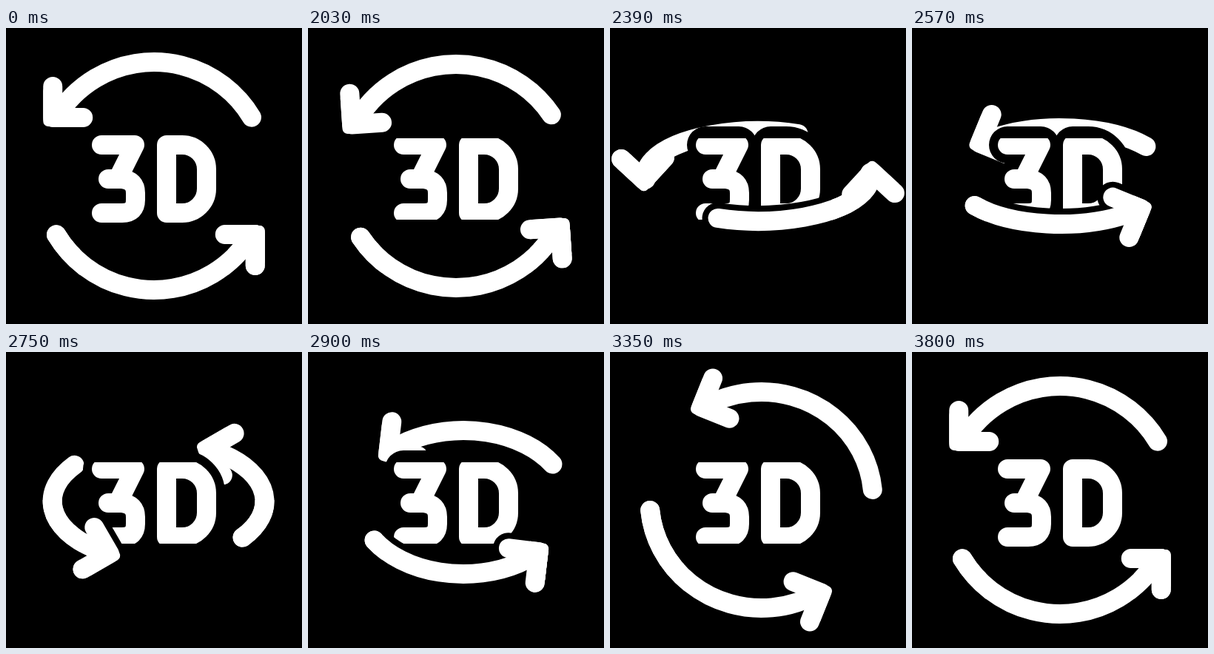
Write an HTML page with a canvas that moves like this. It is 400 px wide and 400 px high and loops after 3.83 s.

```html
<!DOCTYPE html>
<html lang="en">
<head>
<meta charset="utf-8">
<title>3D rotation</title>
<style>
html, body { margin: 0; height: 100%; overflow: hidden; background: #000; }
canvas { display: block; }
</style>
</head>
<body>
<canvas id="stage" width="400" height="400"></canvas>
<script>
const ctx = document.getElementById('stage').getContext('2d');
const LOOP = 3830, HOLD = 2000, STEP = 30, LAST = 60;
const WIDTH = 26, LABEL_HALO = 50, ARROW_HALO = 42, RAD = Math.PI / 180;

const label = new Path2D(
  'M129 158H174L152 202M138 204H157Q175 206 175 223V232Q175 250 157 250H129' +
  'M217 158H238A33 33 0 0 1 271 191V217A33 33 0 0 1 238 250H217Z');
const head = new Path2D('M0 -42V0H41');
const corner = new Path2D('M-6 -36V5H36');

// step, radius x, shift x, radius y, shift y, tip turn, tail turn, head lean (degrees)
const keys = [
  [0, 154, 0, 154, 0, 0, 0, -15],
  [1, 154, 0, 151, 0, 3.3, 2.2, -14],
  [7, 154, 0, 75, 0, 84, 74, -17],
  [13, 152, 0, 61, 0, 215, 218, -10],
  [19, 147, 0.5, 65, 0, 347.4, 367, -3],
  [30, 142, 10, 97, 3, 526, 541, 3],
  [45, 151, 4.5, 146, 0, 692, 694.5, -8],
  [60, 154, 0, 154, 0, 720, 720, -15]
];

const slope = (i, c) => (keys[i + 1][c] - keys[i][c]) / (keys[i + 1][0] - keys[i][0]);

// Harmonic mean of the neighbouring slopes keeps the curve free of overshoot.
function tangent(i, c) {
  if (i === 0 || i === keys.length - 1) return 0;
  const p = slope(i - 1, c), q = slope(i, c);
  return p * q > 0 ? 2 * p * q / (p + q) : 0;
}

function sample(n, c) {
  let i = 0;
  while (i < keys.length - 2 && n >= keys[i + 1][0]) i++;
  const span = keys[i + 1][0] - keys[i][0];
  const u = (n - keys[i][0]) / span, v = 1 - u;
  return keys[i][c] * v * v * (1 + 2 * u) + keys[i + 1][c] * u * u * (3 - 2 * u) +
    span * u * v * (tangent(i, c) * v - tangent(i + 1, c) * u);
}

function stroke(path, width, color) {
  ctx.lineWidth = width;
  ctx.strokeStyle = color;
  ctx.stroke(path);
}

function clipped(x, y, w, h, draw) {
  ctx.save();
  ctx.beginPath();
  ctx.rect(x, y, w, h);
  ctx.clip();
  draw();
  ctx.restore();
}

function makeArrow(n, half) {
  const [a, dx, b, dy, tipTurn, tailTurn, lean] =
    [1, 2, 3, 4, 5, 6, 7].map(c => sample(n, c));
  const tip = (150 + half + tipTurn) * RAD;
  const tail = (31 + half + tailTurn) * RAD;
  const x = 200 + dx, y = 200 + dy;
  const reach = 1 - 0.0017 * lean; // an outward lean carries the head off the arc
  const arc = new Path2D();
  arc.ellipse(x, y, a, b, 0, -tail, -tip + RAD, true);
  return {
    arc,
    front: Math.sin(tip) < 0,
    x: x + a * reach * Math.cos(tip),
    y: y - b * reach * Math.sin(tip),
    turn: 225 * RAD - Math.atan2(b * Math.cos(tip), -a * Math.sin(tip)) - lean * RAD
  };
}

function drawHead(arrow, width, color) {
  ctx.save();
  ctx.translate(arrow.x, arrow.y);
  ctx.rotate(arrow.turn);
  stroke(head, width, color);
  stroke(corner, width - 12, color);
  ctx.restore();
}

function render(n) {
  const arrows = [makeArrow(n, 0), makeArrow(n, 180)];
  const resting = n === 0 || n === LAST;
  ctx.fillStyle = '#000';
  ctx.fillRect(0, 0, 400, 400);
  ctx.lineCap = ctx.lineJoin = 'round';

  for (const arrow of arrows) {
    stroke(arrow.arc, WIDTH, '#fff');
    drawHead(arrow, WIDTH, '#fff');
  }

  // While turning, the lettering is trimmed flat at top and bottom.
  stroke(label, LABEL_HALO, '#000');
  const [top, bottom] = resting ? [0, 400] : [149, 259];
  clipped(0, top, 400, bottom - top, () => stroke(label, WIDTH, '#fff'));

  // The near half passes over the lettering with a black gap.
  const near = arrows.filter(arrow => arrow.front);
  clipped(100, 200, 200, 200, () => arrows.forEach(arrow => stroke(arrow.arc, ARROW_HALO, '#000')));
  clipped(100, 0, 200, 400, () => near.forEach(arrow => drawHead(arrow, ARROW_HALO, '#000')));
  clipped(0, 200, 400, 200, () => arrows.forEach(arrow => stroke(arrow.arc, WIDTH, '#fff')));
  near.forEach(arrow => drawHead(arrow, WIDTH, '#fff'));
}

const start = performance.now();
function tick() {
  const t = (performance.now() - start) % LOOP;
  render(Math.min(LAST, Math.max(0, Math.floor((t - HOLD) / STEP))));
  requestAnimationFrame(tick);
}
tick();
</script>
</body>
</html>
```
